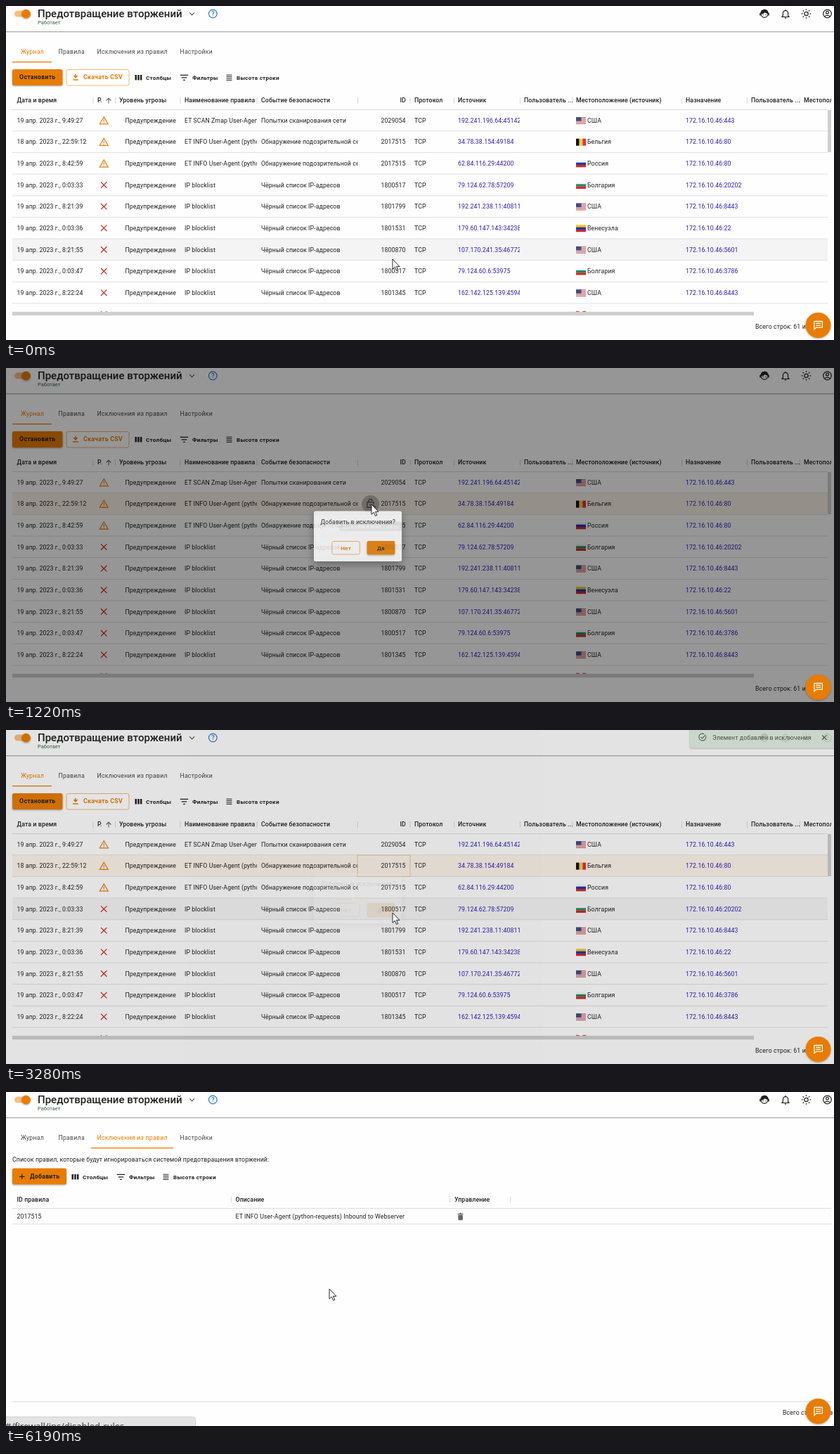
Animation, 1178 px wide and 475 px high, one loop 7.18 s. Source, as an HTML page:

```html
<!DOCTYPE html>
<html lang="ru">
<head>
<meta charset="utf-8">
<title>Предотвращение вторжений</title>
<style>
html, body { margin: 0; width: 100%; height: 100%; overflow: hidden; background: #fefefe; }
svg { display: block; }
text { font: 400 8.75px Roboto, sans-serif; letter-spacing: .0107em; fill: #212121; white-space: pre; }
.h { font-weight: 500; }
.b { font-weight: 600; letter-spacing: .0286em; }
.s { font-size: 8.125px; }
.tab { letter-spacing: .026em; fill: #484848; }
.link { fill: #2a1fb8; }
.ln { fill: none; stroke: #212121; stroke-width: 1.2; }
</style>
</head>
<body>
<svg id="stage" width="100%" height="100%" viewBox="0 0 1178 475"></svg>
<script>
(() => {
const LOOP = 7180, ORANGE = '#e87c05', DARK = '#a35703';
const ROW_TOP = 147.6, ROW_H = 30.65;
const $ = id => document.getElementById(id);

// Markup helpers
const text = (x, y, s, cls = '', attr = '') => `<text x="${x}" y="${y}" class="${cls}" ${attr}>${s}</text>`;
const rect = (x, y, w, h, fill, attr = '') => `<rect x="${x}" y="${y}" width="${w}" height="${h}" fill="${fill}" ${attr}/>`;
const path = (d, attr = '') => `<path d="${d}" class="ln" ${attr}/>`;
const circle = (x, y, r, attr = '') => `<circle cx="${x}" cy="${y}" r="${r}" ${attr}/>`;
const group = (id, body) => `<g id="${id}">${body}</g>`;
const crop = (x, y, w, h, body) => `<svg x="${x}" y="${y}" width="${w}" height="${h}" viewBox="${x} ${y} ${w} ${h}">${body}</svg>`;
const mid = 'text-anchor="middle"', end = 'text-anchor="end"';
const paint = c => `style="fill:${c}"`, line = (c, w = 1.2) => `style="stroke:${c};stroke-width:${w}"`;

const bands = (colors, vertical) => (x, y) => colors.map((c, i) => vertical
  ? rect(x + i * 14 / 3, y, 14 / 3, 10, c)
  : rect(x, y + i * 10 / 3, 14, 10 / 3, c)).join('');
const flags = {
  'США': (x, y) => rect(x, y, 14, 10, '#f3e3e3')
    + [0, 1, 2, 3, 4].map(i => rect(x, y + i * 2.2, 14, 1.1, '#d0656c')).join('') + rect(x, y, 7.5, 5.6, '#3d4f85'),
  'Бельгия': bands(['#111', '#f7cf2f', '#e0303c'], true),
  'Россия': bands(['#f4f4f4', '#1c35b5', '#d8281f']),
  'Болгария': bands(['#f4f4f4', '#1f8a63', '#cf2a22']),
  'Венесуэла': bands(['#f5c916', '#22359c', '#cf2136']),
  'Канада': bands(['#e0301e', '#fff', '#e0301e'], true)
};

const scan = ['ET SCAN Zmap User-Agent (Inbound)', 'Попытки сканирования сети'];
const agent = ['ET INFO User-Agent (python-requests) Inbound to Webserver', 'Обнаружение подозрительной сетевой активности'];
const block = ['IP blocklist', 'Чёрный список IP-адресов'];
const rows = [
  ['19 апр. 2023 г., 9:49:27', scan, 2029054, '192.241.196.64:45142', 'США', 443],
  ['18 апр. 2023 г., 22:59:12', agent, 2017515, '34.78.38.154:49184', 'Бельгия', 80],
  ['19 апр. 2023 г., 8:42:59', agent, 2017515, '62.84.116.29:44200', 'Россия', 80],
  ['19 апр. 2023 г., 0:03:33', block, 1800517, '79.124.62.78:57209', 'Болгария', 20202],
  ['19 апр. 2023 г., 8:21:39', block, 1801799, '192.241.238.11:40811', 'США', 8443],
  ['19 апр. 2023 г., 0:03:36', block, 1801531, '179.60.147.143:34238', 'Венесуэла', 22],
  ['19 апр. 2023 г., 8:21:55', block, 1800870, '107.170.241.35:46772', 'США', 5601],
  ['19 апр. 2023 г., 0:03:47', block, 1800517, '79.124.60.6:53975', 'Болгария', 3786],
  ['19 апр. 2023 г., 8:22:24', block, 1801345, '162.142.125.139:45940', 'США', 8443],
  ['19 апр. 2023 г., 0:04:02', block, 1801345, '162.142.125.9:41120', 'Канада', 80]
];

function tableRow([date, [rule, event], id, src, land, port], i) {
  const y0 = ROW_TOP + i * ROW_H, c = y0 + 15, y = c + 3.1;
  const mark = rule === 'IP blocklist'
    ? path(`M135 ${c - 4.2}l8.4 8.4m0-8.4l-8.4 8.4`, line('#d3302a', 1.3))
    : path(`M139.3 ${c - 5}l6 10.2h-12zm0 3.6v3.4m0 1v1.2`, line('#e6800f', 1.2));
  return text(15.5, y, date) + mark + text(169.5, y, 'Предупреждение')
    + crop(254, y0, 103, 30, text(254, y, rule)) + crop(363, y0, 137.5, 30, text(363, y, event))
    + text(568.5, y, id, '', end) + text(581, y, 'TCP')
    + crop(643, y0, 88, 30, text(643, y, src, 'link'))
    + flags[land](811, c - 4.6) + text(827, y, land)
    + text(967, y, '172.16.10.46:' + port, 'link')
    + rect(9, y0 + ROW_H - 1, 1160, 1, '#e0e0e0');
}

const columns = [[15.5, 'Дата и время'], [130, 'Р.'], [161, 'Уровень угрозы'], [254, 'Наименование правила'],
  [363, 'Событие безопасности'], [560.5, 'ID'], [581, 'Протокол'], [643, 'Источник'], [737, 'Пользователь ...'],
  [811, 'Местоположение (источник)'], [967, 'Назначение'], [1060, 'Пользователь ...'], [1135, 'Местоположение']];
const bars = (xs, y) => xs.map(x => rect(x, y, 1, 9, '#d8d8d8')).join('');

const tools = [0, 3.7, 7.4].map(d => rect(183.5 + d, 98, 2.5, 7.4, '#212121')).join('')
  + text(199, 104.6, 'Столбцы', 'b s')
  + path('M247.8 98.3h11.4m-9.5 3.5h7.6m-5.2 3.5h2.8') + text(265, 104.6, 'Фильтры', 'b s')
  + path('M313.5 98.2h8m-8 2.4h8m-8 2.4h8m-8 2.4h8', line('#212121', 1)) + text(328, 104.6, 'Высота строки', 'b s');

const raised = 'rx="2.5" filter="url(#low)"';

const journal = rect(9, 90, 71.5, 23, ORANGE, raised) + text(44.8, 104.3, 'Остановить', 'b', mid)
  + rect(86, 90.5, 89, 22.5, '#fff', 'rx="2.5" stroke="#f0b67c"')
  + path('M99 96.7v5m-2.6-2.6l2.6 2.7 2.6-2.7m-6.4 6h7.6', line(ORANGE, 1.5))
  + text(110, 104.3, 'Скачать CSV', 'b', paint(ORANGE)) + tools
  + rect(9, 147, 1160, 1, '#dcdcdc')
  + crop(0, 120, 1174, 28, columns.map(([x, s]) => text(x, 137.4, s, 'h')).join(''))
  + path('M146 138.6v-7.6m-3.4 3.5l3.4-3.5 3.4 3.5', line('#666', 1.1))
  + bars([123.5, 155, 247.5, 356.5, 500, 574.5, 637, 731, 805.5, 961, 1054, 1129], 130)
  + crop(9, 148, 1160, 288, rect(9, 0, 1160, ROW_H - 1, '#f4f4f4', 'id="hover"')
    + group('picked', rect(9, ROW_TOP + ROW_H, 1160, ROW_H - 1, '#fdf3e9'))
    + rows.map(tableRow).join('')
    + rect(500, 178, 75, 30.5, 'none', 'id="cell" stroke="#e5c7a4"'))
  + rect(9, 434.8, 1055, 5.4, '#cfcfcf') + rect(1169, 148, 5, 60, '#cfcfcf')
  + group('lock', circle(518.5, 193.5, 12.5, 'id="halo"')
    + path('M521.5 198.4h-7.6v-7.6h9v2.6m-7-2.6v-1.6a2.6 2.6 0 0 1 5.2 0m2 5.4v6m-3-3h6', line('#444', 1.2))
    + circle(518.3, 194.4, 1, 'fill="#444"'))
  + text(1066, 459, 'Всего строк: 61 из 61');

const exclusions = text(9, 99.4, 'Список правил, которые будут игнорироваться системой предотвращения вторжений:')
  + rect(9, 108.5, 77, 23, ORANGE, raised) + path('M19 120.3h7.6m-3.8-3.8v7.6')
  + text(34, 123, 'Добавить', 'b') + `<g transform="translate(-90 19)">${tools}</g>`
  + text(15.5, 156, 'ID правила', 'h') + text(326.5, 156, 'Описание', 'h') + text(638, 156, 'Управление', 'h')
  + bars([320, 631, 717.5], 148.5) + rect(9, 165, 1165, 1, '#dcdcdc')
  + group('record', rect(9, 166, 1165, 21.5, '#f4f4f4', 'id="recordHover"')
    + text(15.5, 180, '2017515') + text(326.5, 180, agent[0])
    + path('M642.6 173.6h8m-5-1.2h2', line('#666', 1.2)) + rect(643.3, 174.8, 6.6, 7.4, '#666', 'rx="1"')
    + rect(9, 187.3, 1165, 1, '#dcdcdc'))
  + rect(9, 440, 1165, 1, '#dcdcdc') + text(1105, 459, 'Всего строк: 1 из 1');

const sun = [...Array(8)].map((_, i) => `<path class="ln" d="M1138.5 4.2v1.9" transform="rotate(${i * 45} 1138.5 11)"/>`).join('');
const header = rect(0, 36, 1178, 1.2, '#a9a9a9') + rect(0, 37.2, 1178, 1, '#ececec')
  + rect(12, 6.6, 21, 9, '#f5c083', 'rx="4.5"') + circle(28.5, 11.2, 6.4, `fill="${ORANGE}" filter="url(#low)"`)
  + text(45, 16.3, 'Предотвращение вторжений', 'h', 'style="font-size:15px;letter-spacing:0"')
  + text(45, 26.2, 'Работает', '', 'style="font-size:7.4px;fill:#31613a"')
  + path('M261.2 9.4l3.4 3.4 3.4-3.4', line('#555'))
  + circle(294.3, 11, 5.8, 'fill="none" stroke="#2a7bc8" stroke-width="1.2"')
  + text(294.4, 14.3, '?', 'h', mid + ' style="fill:#2a7bc8;font-size:9px"')
  + circle(1079, 11.3, 5, 'class="ln"') + path('M1073.9 11q4.4 0 5.6-3 1.4 2.6 4.8 2.4-.8-5-5.2-5-4.8 0-5.2 5.6z', 'style="fill:#212121"')
  + path('M1073 10v3.4m12-3.4v3.4', line('#212121', 1.6)) + circle(1077.2, 12.6, .7) + circle(1081, 12.6, .7)
  + path('M1104 15.5h10l-1.4-1.6v-3.6a3.6 3.6 0 0 0-7.2 0v3.6zM1109 5v1.6m-1.2 10.6h2.4')
  + circle(1138.5, 11, 2.7, 'class="ln"') + sun
  + circle(1168.5, 11, 5.8, 'class="ln"') + circle(1168.5, 9.2, 1.9, 'class="ln"') + path('M1164.5 14.8q4-3 8 0')
  + [[37.5, 'Журнал'], [93.2, 'Правила'], [179.6, 'Исключения из правил'], [270.7, 'Настройки']]
    .map(([x, s], i) => text(x, 68, s, 'tab', `id="tab${i}" ${mid}`)).join('')
  + crop(121, 52, 117, 28, circle(152, 68, 1, `id="ripple" fill="${ORANGE}"`))
  + rect(9, 79, 56, 1.3, ORANGE, 'id="ink"');

const dialog = rect(438, 203.5, 125, 71.5, '#fff', 'rx="2.5" filter="url(#high)"')
  + text(500.7, 222, 'Добавить в исключения?', '', mid)
  + rect(463.8, 246.5, 39.5, 18.6, '#fff', 'rx="2.5" stroke="#efae6b"') + text(483.6, 258.8, 'Нет', 'b s', mid + ' ' + paint(ORANGE))
  + rect(513.5, 246, 39.8, 19.6, ORANGE, raised) + rect(513.5, 246, 39.8, 19.6, DARK, 'id="press" rx="2.5"')
  + text(533.4, 258.8, 'Да', 'b s', mid);

const toast = rect(973, -6, 210, 37, '#e0eee1', 'rx="3" filter="url(#low)"')
  + path('M995.6 14.4a5 5 0 1 1-2.4-3m-4.8 4.2l2 2 5-5.2', line('#3d5a41', 1.1))
  + text(1005, 19.2, 'Элемент добавлен в исключения', '', paint('#37473a'))
  + path('M1161 13l6.4 6.4m0-6.4l-6.4 6.4', line('#4b5c4e', 1.2));

const shade = (id, body) => group(id, rect(0, 0, 1178, 475, '#000', 'fill-opacity=".5"') + body);
const shadow = (id, dy, blur, alpha) => `<filter id="${id}" x="-30%" y="-30%" width="160%" height="180%">
  <feDropShadow dx="0" dy="${dy}" stdDeviation="${blur}" flood-opacity="${alpha}"/></filter>`;

$('stage').innerHTML = `<defs>${shadow('low', 1, 1, .35)}${shadow('high', 4, 6, .4)}</defs>`
  + rect(0, 0, 1178, 475, '#fefefe') + header + group('journal', journal) + group('exclusions', exclusions)
  + group('toast', toast) + shade('dim', '') + group('dialog', dialog)
  + group('tip', rect(474, 218, 90, 14, '#616161', 'rx="2"')
    + text(519, 227.6, 'Добавить в исключения', 'b', mid + ' style="fill:#fff;font-size:6.875px;letter-spacing:.01em"'))
  + shade('busy', path('M502.5 231.3A8 8 0 1 1 493.2 237.7', `id="spin" ${line(ORANGE, 2)}`))
  + group('status', rect(-5, 462, 274.5, 20, '#e4e4e4', 'rx="4" stroke="#cfcfcf"')
    + text(-1, 480, '#/firewall/ips/disabled-rules', '', 'style="font:13px \'Open Sans\',sans-serif;letter-spacing:0;fill:#333"'))
  + circle(1155.5, 454, 18, `fill="${ORANGE}" filter="url(#low)"`)
  + path('M1150 448.5h11.4v8.6h-8.4l-3 2.7zm2.4 2.9h6.6m-6.6 2.8h6.6', line('#fff', 1.3))
  + group('arrow', path('M0 0v14.2l3.3-3 2.3 5.2 2.2-1-2.3-5h4.4z', 'style="fill:#fff;stroke:#111;stroke-width:.9"'))
  + group('hand', path('M-1.2 .8q1.4-1.6 2.6 0v5l4 .8q3.4.6 3.2 3-.2 4-2 6.4h-6q-2.4-3.4-4.6-6 .6-1.8 2.8.4z', 'style="fill:#fff;stroke:#111;stroke-width:1"')
    + path('M1.5 5.8v3.4m2.4-2.8v2.8m2.4-2.2v2.2', line('#111', .7)));

// Timing helpers
const clamp = u => Math.max(0, Math.min(1, u));
const ease = u => u < .5 ? 4 * u ** 3 : 1 - 4 * (1 - u) ** 3;
const out = u => 1 - (1 - u) ** 2.2;
const ramp = (t, a, b) => out(clamp((t - a) / (b - a)));
const pulse = (t, a, b, c, d) => ramp(t, a, b) * (1 - ramp(t, c, d));
const set = (id, name, v) => $(id).setAttribute(name, v);
const show = (id, v) => set(id, 'opacity', +v);

// Pointer stops: time, x, y
const track = [[0, 550, 360], [60, 550, 360], [730, 520, 194], [1620, 520, 194], [2310, 546, 252], [2400, 546, 252],
  [3070, 550, 260], [3870, 550, 260], [4550, 152, 70], [5850, 152, 70], [6190, 460, 280], [LOOP, 460, 280]];

function pointer(t) {
  const i = track.findIndex(k => k[0] > t);
  const [a, x, y] = track[i - 1], [b, x2, y2] = track[i], u = ease((t - a) / (b - a));
  return [x + (x2 - x) * u, y + (y2 - y) * u];
}

function draw(now) {
  const t = now % LOOP;
  const [x, y] = pointer(t);
  const modal = t >= 1100 && t < 3250, second = t >= 4740, picked = t >= 1000;
  const row = modal ? 1 : Math.floor((y - ROW_TOP) / ROW_H);
  const onLock = !modal && !second && Math.hypot(x - 518.5, y - 193.5) < 11;
  const onTab = y < 79 && y > 52 && x > 121 && x < 238;
  const onButton = !second && y > 90 && y < 113 && x > 86 && x < 175;
  const hand = onLock || onTab || onButton;

  set('journal', 'display', second ? 'none' : 'inline');
  set('exclusions', 'display', second ? 'inline' : 'none');
  set('hover', 'y', ROW_TOP + row * ROW_H);
  show('hover', row >= 0);
  show('picked', picked);
  show('cell', picked && t > 3250);
  show('lock', row === 1);
  set('halo', 'fill-opacity', onLock || modal ? .08 * (1 - ramp(t, 1230, 1350)) + .16 * pulse(t, 950, 1080, 1230, 1350) : 0);
  show('record', t > 5000);
  show('recordHover', y > 166 && y < 188);

  show('tip', pulse(t, 620, 720, 1080, 1290));
  const open = pulse(t, 1080, 1340, 3140, 3360);
  show('dim', open);
  show('dialog', open);
  show('press', pulse(t, 2120, 2290, 2600, 2780));
  show('busy', pulse(t, 2560, 2860, 3150, 3360));
  set('spin', 'transform', `rotate(${(t - 3140) * 360 / 1400} 501 239.2)`);

  show('toast', pulse(t, 3150, 3360, 4960, 5200));
  set('toast', 'transform', `translate(0 ${-32 * (1 - ramp(t, 3150, 3390))})`);
  show('status', t > 4610);

  const slide = ramp(t, 4690, 4990);
  set('ink', 'x', 9 + 112 * slide);
  set('ink', 'width', 56 + 61 * slide);
  $('tab0').style.fill = t < 4690 ? ORANGE : '';
  $('tab2').style.fill = t < 4690 ? '' : ORANGE;
  set('ripple', 'r', 1 + 95 * ramp(t, 4640, 5100));
  show('ripple', .16 * pulse(t, 4620, 4700, 5000, 5500));

  for (const [id, on] of [['arrow', !hand], ['hand', hand]]) {
    show(id, on);
    set(id, 'transform', `translate(${x} ${y})`);
  }
}

const start = performance.now();
function tick() {
  draw(performance.now() - start);
  requestAnimationFrame(tick);
}
tick();
})();
</script>
</body>
</html>
```
